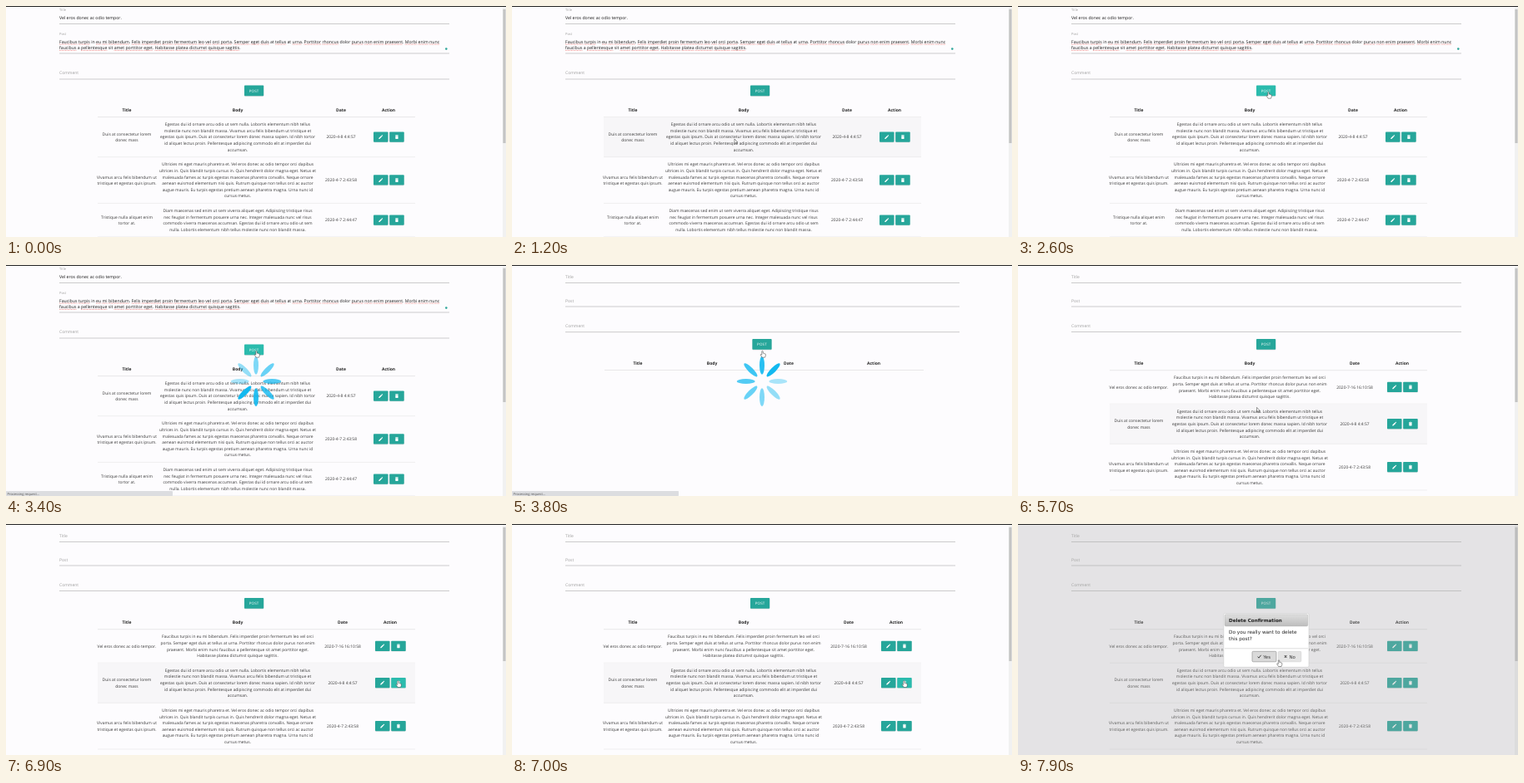
Animation of 600x278 px, one loop 8000 ms. Source, as an HTML page:

```html
<!DOCTYPE html>
<html lang="en">
<head>
<meta charset="utf-8">
<title>Posts</title>
<style>
html, body { margin: 0; width: 100%; height: 100%; overflow: hidden; background: #fdfcfe; }
svg { display: block; width: 100vw; height: 100vh; font-family: "Open Sans", "Noto Sans", sans-serif; text-rendering: geometricPrecision; }
text { white-space: pre; }
.dialog { font-family: "DejaVu Sans", sans-serif; }
</style>
</head>
<body>
<svg id="stage" viewBox="0 0 600 278"></svg>
<script>
const stage = document.getElementById("stage");
const TEAL = "#26a69a", TEAL_HOVER = "#2bbbad", INK = "#383838";
const LINE = 7.6, PADDING = 10.1;
const PENCIL = "M3 17.25V21h3.75L17.81 9.94l-3.75-3.75zM20.71 7.04a1 1 0 0 0 0-1.41l-2.34-2.34a1 1 0 0 0-1.41 0l-1.83 1.83 3.75 3.75z";
const TRASH = "M6 19c0 1.1.9 2 2 2h8c1.1 0 2-.9 2-2V7H6zM19 4h-3.5l-1-1h-5l-1 1H5v2h14z";

let layer = stage, hot = [];

function add(tag, attrs, parent = layer) {
  const node = document.createElementNS("http://www.w3.org/2000/svg", tag);
  for (const key in attrs) node.setAttribute(key, attrs[key]);
  return parent.appendChild(node);
}
const rect = (x, y, width, height, fill, more) => add("rect", { x, y, width, height, fill, ...more });
const rule = (x1, x2, y, stroke, width = 0.6) => add("line", { x1, x2, y1: y, y2: y, stroke, "stroke-width": width });
function text(x, y, value, size, more) {
  const node = add("text", { x, y, "font-size": size, fill: INK, ...more });
  node.textContent = value;
  return node;
}
const centered = (x, y, value, size, more) => text(x, y, value, size, { "text-anchor": "middle", ...more });
const show = (node, on) => node.setAttribute("visibility", on ? "visible" : "hidden");

function hotRect(x, y, w, h, base, over, clickable, more) {
  hot.push({ node: rect(x, y, w, h, base, more), x, y, w, h, base, over, clickable });
}
function button(x, y, w, h) {
  rect(x, y + 0.6, w, h, "#000", { rx: 0.8, opacity: 0.12 });
  hotRect(x, y, w, h, TEAL, TEAL_HOVER, true, { rx: 0.8 });
}
function iconButton(x, y, path) {
  button(x, y, 17.5, 12.2);
  add("path", { d: path, fill: "#fff", transform: `translate(${x + 5.5} ${y + 2.9}) scale(.27)` });
}

const typed = (x, y, value) => text(x, y, value, 5.19, { fill: "#1c1c1c" });

// Spell-checker marks below every unknown word
function misspelled(x, y, value) {
  const line = typed(x, y, value);
  for (const word of value.matchAll(/[a-z]+/gi)) {
    if (/^(in|at|a|sit|dolor)$/.test(word[0])) continue;
    const from = line.getStartPositionOfChar(word.index).x;
    const to = line.getEndPositionOfChar(word.index + word[0].length - 1).x;
    rule(from, to, y + 1.6, "#e8635f", 0.55).setAttribute("stroke-dasharray", "1 .4");
  }
}

function form(right, lines, labels, buttonX, buttonY) {
  lines.forEach(y => rule(64, right, y, "#b0b0b0", 0.65));
  ["Title", "Post", "Comment"].forEach((name, i) =>
    text(64, labels[i][0], name, labels[i][1], { fill: "#9e9e9e" }));
  button(buttonX, buttonY, 23.2, 12.8);
  centered(buttonX + 11.6, buttonY + 8.1, "POST", 4.5, { fill: "#fff", "letter-spacing": 0.15 });
}

function scrollbar() {
  rect(596, 1, 4, 277, "#f1f1f1");
  rect(596.4, 4, 3.2, 161, "#c4c4c4");
}

function table(top, left, right, columns, rows) {
  ["Title", "Body", "Date", "Action"].forEach((name, i) =>
    centered(columns[i], top - 6.6, name, 5, { "font-weight": 700, fill: "#222" }));
  rule(left, right, top, "#dadada");
  for (const [title, body, date] of rows) {
    const height = body.length * LINE + PADDING, mid = top + height / 2;
    const cell = (x, lines) => lines.forEach((line, i) =>
      centered(x, mid + 1.8 + (i - (lines.length - 1) / 2) * LINE, line, 4.91));
    hotRect(left, top, right - left, height, "transparent", "#f7f6f8", false, { rx: 0.6 });
    rule(left, right, top + height, "#e4e4e4");
    cell(columns[0], title);
    cell(columns[1], body);
    cell(columns[2], [date]);
    iconButton(columns[3] - 18, mid - 6.2, PENCIL);
    iconButton(columns[3] + 1.2, mid - 6.2, TRASH);
    top += height;
  }
}

function page(draw) {
  layer = add("g", {}, stage);
  hot = [];
  draw();
  const made = { node: layer, hot };
  layer = stage;
  return made;
}
function group(draw, attrs = {}) {
  layer = add("g", attrs, stage);
  draw();
  const made = layer;
  layer = stage;
  return made;
}

const newRow = [["Vel eros donec ac odio tempor."], [
  "Faucibus turpis in eu mi bibendum. Felis imperdiet proin fermentum leo vel orci",
  "porta. Semper eget duis at tellus at urna. Porttitor rhoncus dolor purus non enim",
  "praesent. Morbi enim nunc faucibus a pellentesque sit amet porttitor eget.",
  "Habitasse platea dictumst quisque sagittis."], "2020-7-16 16:10:58"];
const oldRows = [
  [["Duis at consectetur lorem", "donec mass"], [
    "Egestas dui id ornare arcu odio ut sem nulla. Lobortis elementum nibh tellus",
    "molestie nunc non blandit massa. Vivamus arcu felis bibendum ut tristique et",
    "egestas quis ipsum. Duis at consectetur lorem donec massa sapien. Id nibh tortor",
    "id aliquet lectus proin. Pellentesque adipiscing commodo elit at imperdiet dui",
    "accumsan."], "2020-4-8 4:4:57"],
  [["Vivamus arcu felis bibendum ut", "tristique et egestas quis ipsum."], [
    "Ultricies mi eget mauris pharetra et. Vel eros donec ac odio tempor orci dapibus",
    "ultrices in. Quis blandit turpis cursus in. Quis hendrerit dolor magna eget. Netus et",
    "malesuada fames ac turpis egestas maecenas pharetra convallis. Neque ornare",
    "aenean euismod elementum nisi quis. Rutrum quisque non tellus orci ac auctor",
    "augue mauris. Eu turpis egestas pretium aenean pharetra magna. Urna nunc id",
    "cursus metus."], "2020-4-7 2:43:58"],
  [["Tristique nulla aliquet enim", "tortor at."], [
    "Diam maecenas sed enim ut sem viverra aliquet eget. Adipiscing tristique risus",
    "nec feugiat in fermentum posuere urna nec. Integer malesuada nunc vel risus",
    "commodo viverra maecenas accumsan. Egestas dui id ornare arcu odio ut sem",
    "nulla. Lobortis elementum nibh tellus molestie nunc non blandit massa."], "2020-4-7 2:44:47"]
];
const emptyLabels = [[15.7, 5], [44.7, 5], [74.7, 5]];

const pages = [
  page(() => {
    form(532, [21.5, 57, 88], [[6, 4], [35, 4], [81.7, 5]], 286, 95.5);
    typed(64, 15.7, "Vel eros donec ac odio tempor.");
    misspelled(64, 44.5, "Faucibus turpis in eu mi bibendum. Felis imperdiet proin fermentum leo vel orci porta. Semper eget duis at tellus at urna. Porttitor rhoncus dolor purus non enim praesent. Morbi enim nunc");
    misspelled(64, 51.8, "faucibus a pellentesque sit amet porttitor eget. Habitasse platea dictumst quisque sagittis.");
    add("circle", { cx: 528.3, cy: 51.6, r: 1.3, fill: "#2fa79b" });
    table(133.6, 110, 491, [145, 278, 402, 459], oldRows);
    scrollbar();
  }),
  page(() => {
    form(537, [21.5, 50, 80.7], emptyLabels, 288.4, 89);
    table(126.5, 111, 494, [151, 240, 332, 434], []);
  }),
  page(() => {
    form(532, [21.5, 50, 80.5], emptyLabels, 286, 89);
    table(126.7, 110, 491, [145, 278, 404, 461], [newRow, ...oldRows.slice(0, 2)]);
    scrollbar();
  })
];

const petals = [];
const spinner = group(() => {
  for (let i = 0; i < 8; i++)
    petals.push(add("ellipse", { cy: -19.3, rx: 3, ry: 11, fill: "#12b9f0", transform: `translate(300 140) rotate(${i * 45})` }));
});

const status = group(() => {
  rect(0, 272, 200, 6, "#dcdde0", { rx: 0.8 });
  text(1.5, 276.6, "Processing request...", 4, { fill: "#555" });
});

const dialog = group(() => {
  const shade = add("linearGradient", { id: "shade", x2: 0, y2: 1 });
  add("stop", { offset: 0, "stop-color": "#dedede" }, shade);
  add("stop", { offset: 1, "stop-color": "#bdbdbd" }, shade);
  rect(0, 0, 600, 278, "#aaa", { opacity: 0.3 });
  rect(246.8, 107.5, 102.2, 64.8, "#fff", { rx: 1.6, stroke: "#c4c4c4", "stroke-width": 0.5 });
  rect(248, 108.8, 99.8, 14.2, "url(#shade)", { rx: 1.4, stroke: "#aaa", "stroke-width": 0.4 });
  text(253, 117.8, "Delete Confirmation", 5.63, { "font-weight": 700, fill: "#222" });
  text(253, 132.4, "Do you really want to delete", 5.75, { fill: "#222" });
  text(253, 140.4, "this post?", 5.75, { fill: "#222" });
  rule(248, 348, 149.8, "#bbb", 0.5);
  rect(281, 153.3, 29, 12.5, "#dadada", { rx: 1.3, stroke: "#888", "stroke-width": 0.6 });
  rect(312.3, 153.3, 27.5, 12.5, "#e4e4e4", { rx: 1.3, stroke: "#c8c8c8", "stroke-width": 0.5 });
  add("path", { d: "M287.6 159.6l1.4 1.6 2.6-3.4M319.8 158l2.6 3M322.4 158l-2.6 3", fill: "none", stroke: "#444", "stroke-width": 1 });
  text(294.2, 161.6, "Yes", 5.5);
  text(325.4, 161.6, "No", 5.5);
}, { class: "dialog" });

rect(0, 0, 600, 1, "#222");

const outline = { fill: "#fff", stroke: "#333", "stroke-width": 0.5, "stroke-linejoin": "round" };
const arrow = add("path", { d: "M0 0V5.6L1.3 4.4L2.2 6.4L3 6L2.1 4.1H3.9Z", ...outline });
const hand = add("path", { d: "M-.7 .6Q0-.4.7.6V3Q1.4 2.6 1.9 3.2Q2.6 2.9 3 3.6Q3.8 3.4 3.8 4.4V6L3 8H-.4L-2.3 5Q-2.2 4-1.3 4.4L-.7 5Z", ...outline });

// Pointer path: time, x, y
const path = [[100, 528, 49], [1200, 267, 160], [1700, 276, 148], [2200, 300.5, 103.2], [5100, 300.5, 103.2],
  [5900, 284, 184], [6300, 470.5, 188.5], [7000, 470.5, 188.5], [7700, 440, 214], [7900, 313, 163.5]];

function pointer(t) {
  const next = path.findIndex(key => key[0] > t);
  if (next === 0) return path[0].slice(1);
  if (next < 0) return path[path.length - 1].slice(1);
  const [t0, x0, y0] = path[next - 1], [t1, x1, y1] = path[next];
  const u = (t - t0) / (t1 - t0), s = u * u * (3 - 2 * u);
  return [x0 + (x1 - x0) * s, y0 + (y1 - y0) * s];
}

function draw(now) {
  const t = Math.floor((now % 8000) / 100) * 100;
  const current = t < 3700 ? 0 : t < 4300 ? 1 : 2;
  const modal = t >= 7100;
  const [x, y] = pointer(t);
  let pointing = (t >= 2200 && t <= 5100) || t >= 7900;

  pages.forEach((p, i) => show(p.node, i === current));
  for (const h of pages[current].hot) {
    const inside = !modal && x >= h.x && x < h.x + h.w && y >= h.y && y < h.y + h.h;
    h.node.setAttribute("fill", inside ? h.over : h.base);
    if (inside && h.clickable) pointing = true;
  }

  const head = Math.floor((t - 3800) / 125) + 1;
  petals.forEach((petal, i) => {
    const behind = (((head - i) % 8) + 8) % 8;
    petal.setAttribute("opacity", 1 - behind * 0.092);
  });
  show(spinner, t >= 2800 && t < 4300);
  show(status, t >= 2800 && t < 4600);
  show(dialog, modal);

  // The pointer stays hidden after typing until it is moved
  show(hand, pointing);
  show(arrow, !pointing && t >= 200);
  for (const shape of [hand, arrow]) shape.setAttribute("transform", `translate(${x} ${y})`);
}

const start = performance.now();
function tick() {
  draw(performance.now() - start);
  requestAnimationFrame(tick);
}
tick();
</script>
</body>
</html>
```
